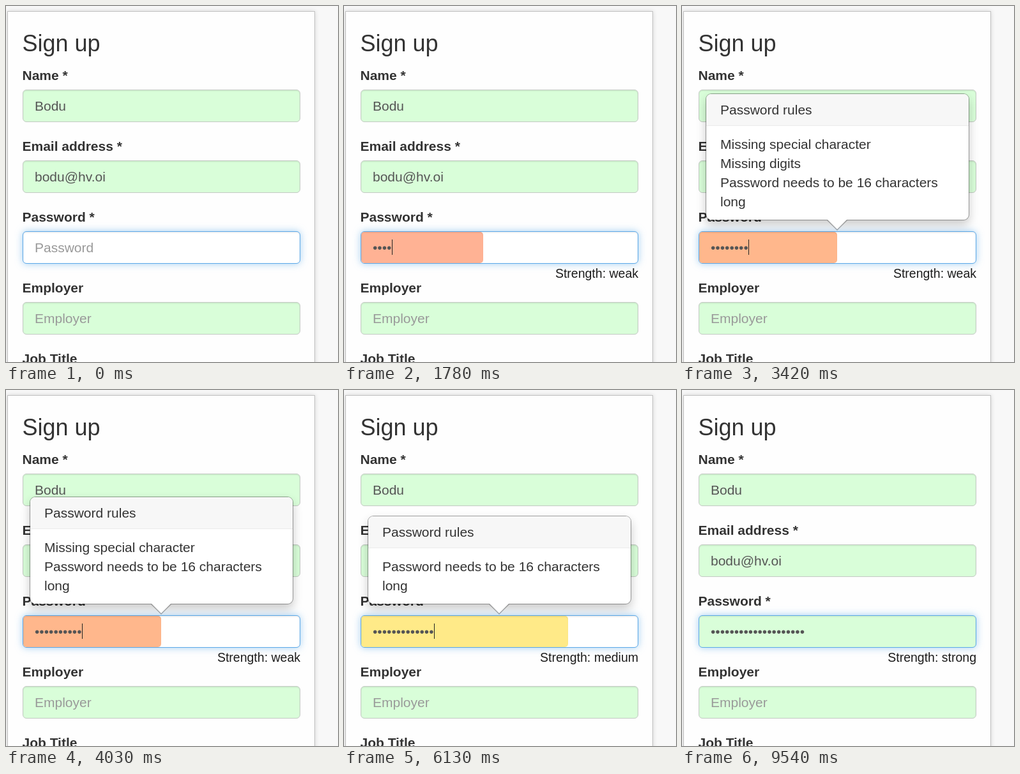
Write an HTML page that moves like this. It is 520 by 558 pixels and loops after 9660 ms.

```html
<!DOCTYPE html>
<html lang="en">
<head>
<meta charset="utf-8">
<title>Sign up</title>
<style>
  * { box-sizing: border-box; }
  html, body { margin: 0; width: 100%; height: 100%; overflow: hidden; }
  body {
    position: relative;
    background: #f8f8f8;
    color: #333;
    font: 21px/30px "Liberation Sans", Arial, sans-serif;
  }
  body * { position: absolute; white-space: nowrap; }

  .card {
    left: 2px; top: 8px; width: 482px; height: 600px;
    background: #fefefe;
    border: 1px solid #c0c0c0;
    box-shadow: 0 0 7px rgba(0, 0, 0, .14);
  }
  h3 { margin: 0; left: 25.5px; top: 39px; font-size: 36px; line-height: 40px; font-weight: 400; }

  .group { left: 26px; width: 435px; }
  label { left: -.5px; top: 0; font-weight: 700; }
  .field {
    left: 0; top: 37px; width: 100%; height: 51px;
    background: #d9fed9;
    border: 1px solid #c3c9c3;
    border-radius: 6px;
    box-shadow: inset 0 1.5px 1.5px rgba(0, 0, 0, .075);
    color: #555;
  }
  .field span { left: 18px; top: 9.5px; }
  .field .hint { color: #999; }
  #pass {
    border-color: #5ba8e8;
    box-shadow: inset 0 1.5px 1.5px rgba(0, 0, 0, .075), 0 0 12px rgba(102, 175, 233, .6);
  }
  #fill {
    left: 0; top: 0; height: 100%;
    border-radius: 5px;
    box-shadow: inset 0 1.5px 1.5px rgba(0, 0, 0, .075);
  }
  #caret { top: 12px; width: 1px; height: 24px; background: #222; }
  #strength { right: 59px; top: 404px; font-size: 19.5px; color: #1c1c1c; }

  #tip {
    left: 37px; bottom: 222px; width: 413px;
    background: #fff;
    background-clip: padding-box;
    border: 1px solid rgba(0, 0, 0, .35);
    border-radius: 9px;
    box-shadow: 0 7.5px 15px rgba(0, 0, 0, .2);
  }
  #tip .title {
    position: relative;
    height: 50px; padding: 12px 22px; line-height: 25px;
    background: #f7f7f7;
    border-bottom: 1px solid #ebebeb;
    border-radius: 8px 8px 0 0;
  }
  #rules { position: relative; padding: 13.5px 22px; }
  #rules div { position: relative; white-space: normal; }
  .arrow, .arrow::after {
    position: absolute; left: 50%; width: 0; height: 0;
    border: solid transparent;
  }
  .arrow {
    bottom: -16.5px; margin-left: -16.5px;
    border-width: 16.5px 16.5px 0;
    border-top-color: rgba(0, 0, 0, .3);
  }
  .arrow::after {
    content: ""; left: -15px; top: -16.5px;
    border-width: 15px 15px 0;
    border-top-color: #fff;
  }
</style>
</head>
<body>
  <div class="card"></div>
  <h3>Sign up</h3>

  <div class="group" style="top:94px">
    <label>Name *</label>
    <div class="field"><span>Bodu</span></div>
  </div>
  <div class="group" style="top:205px">
    <label>Email address *</label>
    <div class="field"><span>bodu@hv.oi</span></div>
  </div>
  <div class="group" style="top:316px">
    <label>Password *</label>
    <div class="field" id="pass">
      <div id="fill"></div>
      <span class="hint" id="hint">Password</span>
      <span id="dots"></span>
      <div id="caret"></div>
    </div>
  </div>
  <div id="strength"></div>
  <div class="group" style="top:427px">
    <label>Employer</label>
    <div class="field"><span class="hint">Employer</span></div>
  </div>
  <div class="group" style="top:538px">
    <label>Job Title</label>
  </div>

  <div id="tip">
    <div class="title">Password rules</div>
    <div id="rules"></div>
    <div class="arrow"></div>
  </div>

<script>
  const LOOP = 9660, BLUR = 9540;
  const FADE = 150, GROW = 385, BLINK = 560;
  const PITCH = 7.35, QUARTER = 108.25;
  const $ = id => document.getElementById(id);

  const burst = (start, count = 1, gap = 0) =>
    ({ start, end: start + (count - 1) * gap, count, gap });

  const bursts = [
    burst(620), burst(1480, 3, 150), burst(2420, 4, 150), burst(3650, 2, 150),
    burst(4800, 2, 370), burst(6130), burst(6740, 2, 80), burst(6870, 5, 180),
  ];
  const keys = bursts.flatMap(b =>
    Array.from({ length: b.count }, (_, i) => b.start + i * b.gap));

  const ratings = [
    { at: 740, name: "very weak", rgb: [255, 162, 173] },
    { at: 1485, name: "weak", rgb: [255, 183, 140] },
    { at: 4950, name: "medium", rgb: [255, 234, 136] },
    { at: 6980, name: "strong", rgb: [193, 251, 146] },
  ];

  const ruleList = [
    { text: "Missing uppercase letter", met: 1800 },
    { text: "Missing special character", met: 5150 },
    { text: "Missing digits", met: 3910 },
    { text: "Password needs to be 16 characters long", met: LOOP },
  ];

  const ramp = (t, from, length) => Math.min(1, Math.max(0, (t - from) / length));

  // Each burst hides the popover; it returns when typing rests.
  function tipOpacity(t) {
    return bursts.reduce((opacity, { start, end }, i) => {
      const hide = start + FADE;
      const show = Math.max(end, hide) + FADE / 2;
      const out = i === 0 ? 0 : 1 - ramp(t, hide, FADE);
      const back = i === bursts.length - 1 ? 0 : ramp(t, show, FADE);
      return opacity * Math.max(out, back);
    }, 1);
  }

  function drawMeter(t) {
    const reached = ratings.filter(r => r.at <= t);
    const now = reached.pop();
    const blurred = t >= BLUR;
    $("fill").hidden = blurred || !now;
    $("pass").style.background = blurred ? "" : "#fff";
    $("strength").textContent = now ? "Strength: " + now.name : "";
    if (!now) return;

    const k = ramp(t, now.at, GROW);
    const before = reached.length ? reached[reached.length - 1].rgb : now.rgb;
    const rgb = now.rgb.map((c, i) => Math.round(before[i] + (c - before[i]) * k));
    $("fill").style.width = Math.floor((reached.length + k) * QUARTER) + "px";
    $("fill").style.background = `rgb(${rgb})`;
  }

  function drawText(t) {
    const pressed = keys.filter(k => k <= t);
    const typed = pressed.length;
    const lastKey = typed ? pressed[typed - 1] : 160 - 2 * BLINK;
    $("hint").hidden = typed > 0;
    $("dots").textContent = "•".repeat(typed);
    $("caret").style.left = 19 + Math.floor(PITCH * typed) + "px";
    $("caret").hidden = Math.floor((t - lastKey) / BLINK) % 2 === 1;
  }

  let shown;
  function drawTip(t) {
    const html = ruleList.filter(r => t < r.met).map(r => `<div>${r.text}</div>`).join("");
    if (html !== shown) $("rules").innerHTML = shown = html;
    $("tip").style.opacity = tipOpacity(t);
  }

  const start = performance.now();
  function tick() {
    const t = (performance.now() - start) % LOOP;
    drawMeter(t);
    drawText(t);
    drawTip(t);
    requestAnimationFrame(tick);
  }
  tick();
</script>
</body>
</html>
```
